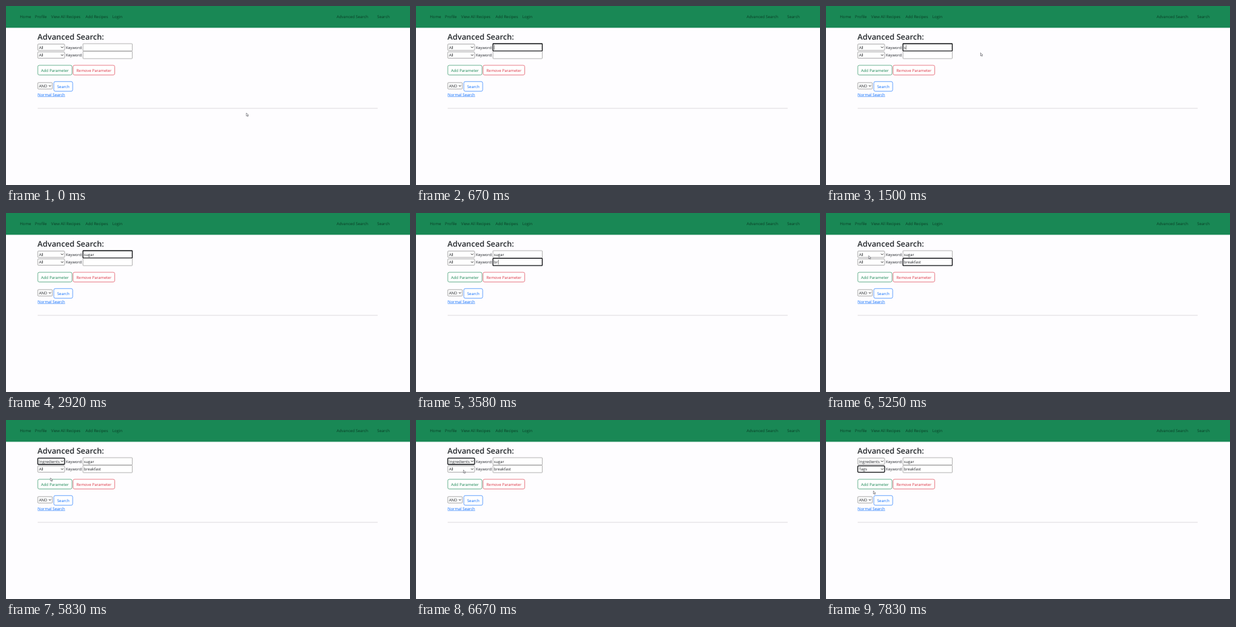
Write an HTML page that moves like this. It is 600x266 px and loops after 8000 ms.

```html
<!DOCTYPE html>
<html lang="en">
<head>
<meta charset="utf-8">
<title>Advanced Search</title>
<style>
html, body { margin: 0; width: 100%; height: 100%; overflow: hidden; background: #fefdff; }
svg { display: block; width: 600px; height: 266px; }
text { font: 5.9px "Open Sans", "Noto Sans", sans-serif; fill: #26292d; text-rendering: geometricPrecision; white-space: pre; }
.nav text { fill: #0b3f27; }
h2, .title { font-size: 11.6px; font-weight: 600; fill: #212529; }
</style>
</head>
<body>
<svg id="stage" viewBox="0 0 600 266"></svg>
<script>
const NS = "http://www.w3.org/2000/svg";
const stage = document.getElementById("stage");
const LOOP = 8000, STEP = 1000 / 12;

function add(name, attrs, parent = stage) {
  const el = document.createElementNS(NS, name);
  for (const key in attrs) el.setAttribute(key, attrs[key]);
  parent.appendChild(el);
  return el;
}

function label(x, y, str, attrs = {}, parent = stage) {
  const el = add("text", { x, y, ...attrs }, parent);
  el.textContent = str;
  return el;
}

function box(x, y, width, height, stroke, rx, line = 0.6) {
  return add("rect", { x, y, width, height, rx, stroke, fill: "#fff", "stroke-width": line });
}

function button(x, y, width, str, color, size) {
  box(x, y, width, 14.4, color, 2.3);
  label(x + 4.9, y + 9.6, str, { style: `fill:${color};font-size:${size}px` });
}

function select(y, width, str) {
  const frame = box(47.2, y, width, 9.4, "#767676", 1);
  const text = label(48.9, y + 7, str);
  const cx = 47.2 + width - 3.6;
  add("path", { d: `M${cx - 1.6} ${y + 3.9}l1.6 1.7l1.6 -1.7`, fill: "none", stroke: "#222", "stroke-width": 0.9 });
  return { frame, text };
}

function input(y) {
  const frame = box(114.3, y, 73.2, 10.8, "#858585", 0.6);
  const text = label(115.8, y + 7.5, "", { style: "font-size:5.8px" });
  const caret = add("rect", { y: y + 2, width: 0.5, height: 7, fill: "#111" });
  return { frame, text, caret };
}

function focus(frame, on, idle) {
  frame.setAttribute("stroke", on ? "#15171a" : idle);
  frame.setAttribute("stroke-width", on ? 1.3 : 0.6);
}

// Static page
const nav = add("g", { class: "nav" });
add("rect", { width: 600, height: 32.4, fill: "#198855" }, nav);
[[20.5, "Home"], [43, "Profile"], [67, "View All Recipes"], [118, "Add Recipes"],
 [158, "Login"], [491, "Advanced Search"], [551.3, "Search"]]
  .forEach(([x, str]) => label(x, 17.8, str, {}, nav));

label(46.8, 49.8, "Advanced Search:", { class: "title" });
const selects = [select(56.6, 39.8, "All"), select(68.2, 39.8, "All")];
[63.8, 75.3].forEach(y => label(89, y, "Keyword:", { style: "font-size:5.7px" }));
const inputs = [input(56), input(67.4)];
button(47.2, 88.1, 50.8, "Add Parameter", "#198754", 5.85);
button(99.6, 88.1, 61.9, "Remove Parameter", "#dc3545", 5.85);
select(113.9, 21.6, "AND");
button(71, 112.3, 28, "Search", "#0d6efd", 5.85);
label(47, 133.9, "Normal Search", { style: "fill:#0d6efd" });
add("rect", { x: 47, y: 134.6, width: 40.8, height: 0.5, fill: "#0d6efd" });
add("rect", { x: 47, y: 151.7, width: 505, height: 0.7, fill: "#cfced2" });

const cursor = add("path", {
  d: "M0 0V4.6L1.1 3.6L1.9 5.3L2.7 4.9L1.9 3.3H3.3Z",
  fill: "#fff", stroke: "#3c3c44", "stroke-width": 0.5, "stroke-linejoin": "round"
});

// Timeline, in ms
const words = [
  { str: "sugar", keys: [1500, 1830, 2000, 2080, 2250] },
  { str: "breakfast", keys: [3420, 3580, 3670, 3830, 3920, 4080, 4170, 4330, 4500] }
];
const carets = [[[670, 1250], [1500, 2750]], [[3080, 4750]]];
const path = [
  [0, 357, 159], [420, 150, 60], [750, 170, 66], [1000, 229.5, 69.5],
  [2670, 229.5, 69.5], [2920, 165, 72], [4670, 120, 72], [5250, 63.4, 63.4],
  [5500, 63.4, 63.4], [5830, 66, 86], [6330, 66, 86], [6670, 70.4, 74.2],
  [6750, 70.4, 74.2], [7080, 70.4, 105.3], [8000, 70.4, 105.3]
];

const within = (t, [a, b]) => t >= a && t < b;

function pointer(t) {
  const i = Math.max(1, path.findIndex(p => p[0] > t));
  const [t0, x0, y0] = path[i - 1], [t1, x1, y1] = path[i];
  const u = (t - t0) / (t1 - t0);
  const e = u * u * (3 - 2 * u);
  return [x0 + (x1 - x0) * e, y0 + (y1 - y0) * e];
}

function draw(time) {
  // The page repaints twelve times a second
  const t = Math.floor((time + 4) / STEP) * STEP + 4;

  inputs.forEach((field, i) => {
    const { str, keys } = words[i];
    field.text.textContent = str.slice(0, keys.filter(k => t >= k).length);
    focus(field.frame, within(t, [[670, 3080], [3080, 5500]][i]), "#858585");
    const width = field.text.textContent ? field.text.getComputedTextLength() : 0;
    field.caret.setAttribute("x", 116 + width);
    field.caret.style.display = carets[i].some(r => within(t, r)) ? "" : "none";
  });

  selects[0].text.textContent = t >= 5750 ? "Ingredients" : "All";
  selects[1].text.textContent = t >= 7830 ? "Tags" : "All";
  focus(selects[0].frame, within(t, [5500, 6750]), "#767676");
  focus(selects[1].frame, t >= 6750, "#767676");

  // The arrow gives way over the text fields
  const [x, y] = pointer(Math.min(t, LOOP - 1));
  const overField = x > 113 && x < 188 && y > 55 && y < 79;
  cursor.style.display = overField ? "none" : "";
  cursor.setAttribute("transform", `translate(${x.toFixed(2)} ${y.toFixed(2)})`);
}

const start = performance.now();
function tick() {
  draw((performance.now() - start) % LOOP);
  requestAnimationFrame(tick);
}
draw(0);
requestAnimationFrame(tick);
</script>
</body>
</html>
```
